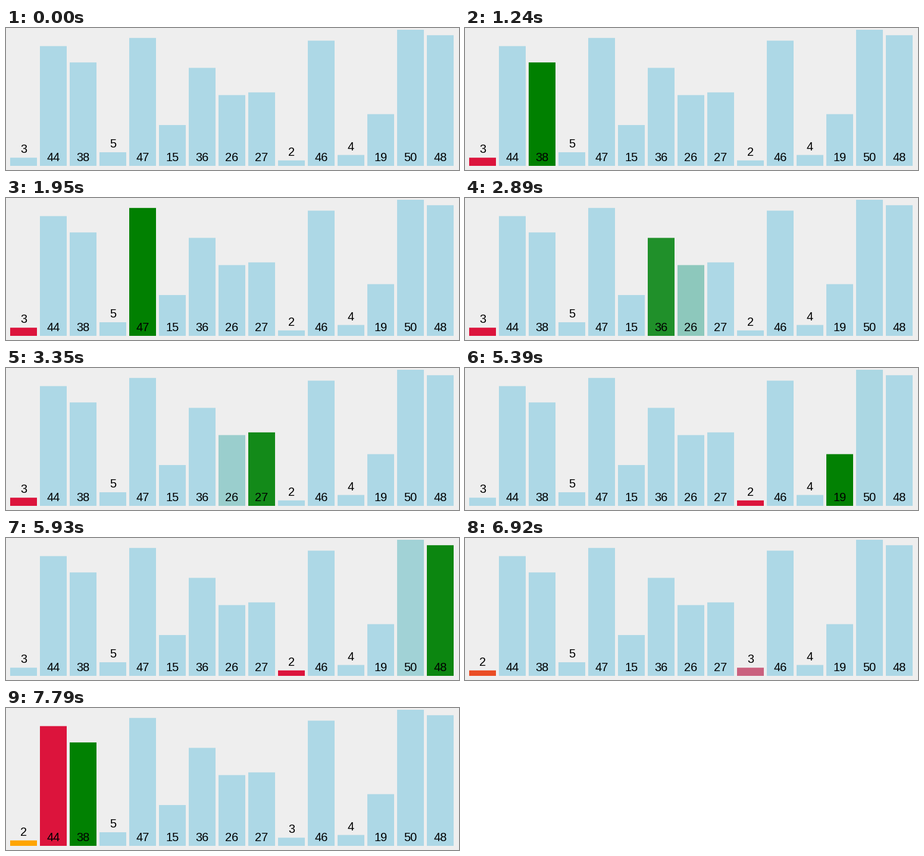
A matplotlib script that plays this animation: 761 px wide and 240 px high, repeating every 8000 ms.

```python
import math

import matplotlib.pyplot as plt
import numpy as np
from matplotlib.animation import FuncAnimation
from matplotlib.colors import to_rgb
from matplotlib.patches import Rectangle

W, H, DPI = 761, 240, 100
LOOP, INTERVAL = 8000, 20

VALUES = [3, 44, 38, 5, 47, 15, 36, 26, 27, 2, 46, 4, 19, 50, 48]
COUNT = len(VALUES)
PITCH, BAR_W, LEFT, FLOOR, UNIT = 50, 45, 7, 233, 4.6
PLAIN, SCAN, MIN, SORTED = (
    np.array(to_rgb(c)) for c in ("lightblue", "green", "crimson", "orange"))

# The picture refreshes on a coarse tick; each stage first shows at a tick.
TICK, TICK_START = 77.8, 400
STAGE_TICKS = [0, 4, 8, 14, 18, 23, 27, 32, 36, 42, 46,
               50, 56, 60, 64, 69, 75, 79, 84, 89, 93]
STAGE_START, STAGE_PERIOD, FADE = 227, 365, 300


def build_stages():
    """Selection sort: first pass, swap, and the start of the second pass."""
    colors, slots = [PLAIN] * COUNT, list(range(COUNT))
    stages = []

    def push(**marks):
        for name, bars in marks.items():
            tone = {"plain": PLAIN, "scan": SCAN,
                    "low": MIN, "done": SORTED}[name]
            for b in bars:
                colors[b] = tone
        stages.append((np.array(colors), np.array(slots, float)))

    push()
    push(low=[0])
    push(scan=[1])
    for j in range(2, 10):
        push(plain=[j - 1], scan=[j])
    push(plain=[0], low=[9])
    push(scan=[10])
    for j in range(11, COUNT):
        push(plain=[j - 1], scan=[j])
    push(plain=[COUNT - 1], low=[0])
    slots[0], slots[9] = slots[9], slots[0]
    push()
    push(plain=[0], done=[9])
    push(low=[1])
    push(scan=[2])
    return stages


def ease(u):
    u = min(max(u, 0), 1)
    return 4 * u ** 3 if u < 0.5 else 1 - 4 * (1 - u) ** 3


def pose(ms):
    tick = math.floor((ms - TICK_START + 8) / TICK)
    stage = sum(tick >= first for first in STAGE_TICKS)
    if stage == 0:
        return STAGES[0]
    now = TICK_START + TICK * tick
    begin = STAGE_START + STAGE_PERIOD * (stage - 1)
    t = ease((now - begin) / FADE)
    return tuple(a + (b - a) * t
                 for a, b in zip(STAGES[stage - 1], STAGES[stage]))


STAGES = build_stages()

plt.rcParams["font.family"] = "Liberation Sans"
fig = plt.figure(figsize=(W / DPI, H / DPI), dpi=DPI, facecolor="#eeeeee")
ax = fig.add_axes([0, 0, 1, 1])
ax.set_xlim(0, W)
ax.set_ylim(H, 0)
ax.axis("off")

bars, labels = [], []
for i, value in enumerate(VALUES):
    top = FLOOR - value * UNIT
    bar = Rectangle((0, top), BAR_W, FLOOR - top, lw=0, snap=False, zorder=i)
    bars.append(ax.add_patch(bar))
    base = (FLOOR if value > 9 else top) - 8
    labels.append(ax.text(0, base, str(value), fontsize=20 * 72 / DPI,
                          color="black", ha="center", va="baseline",
                          zorder=i + 0.5))


def draw(frame):
    colors, slots = pose((frame + 0.5) * INTERVAL)
    for bar, label, color, slot in zip(bars, labels, colors, slots):
        x = LEFT + PITCH * slot
        bar.set_x(x)
        bar.set_facecolor(color)
        label.set_x(x + BAR_W / 2)
    return bars + labels


anim = FuncAnimation(fig, draw, frames=LOOP // INTERVAL, interval=INTERVAL,
                     repeat=True, repeat_delay=0)
plt.show()
```
